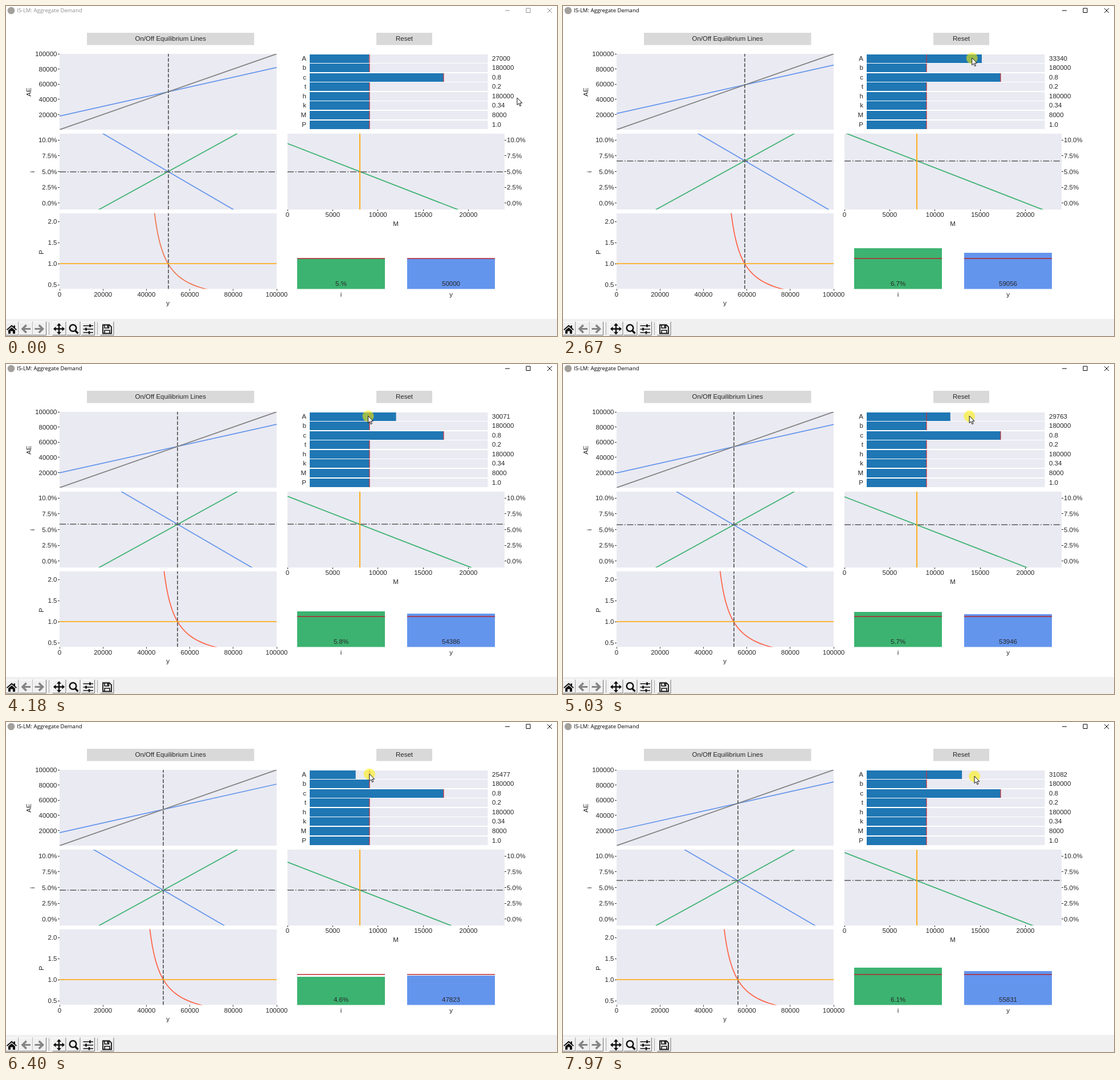
These frames come from a looping animation (967x579 px, 8000 ms). An HTML page:

```html
<!DOCTYPE html>
<html lang="en">
<head>
<meta charset="utf-8">
<title>IS-LM: Aggregate Demand</title>
<style>
html, body { margin: 0; width: 100%; height: 100%; overflow: hidden; background: #fff; }
#stage { display: block; width: 967px; height: 579px; }
text { font-family: "Liberation Sans", Arial, sans-serif; font-size: 11.5px; fill: #262626; }
.title { font-family: "Open Sans", sans-serif; font-size: 9.5px; }
</style>
</head>
<body>
<svg id="stage" viewBox="0 0 967 579"></svg>
<script>
const stage = document.getElementById('stage');
const LOOP = 8000, FOCUS = 1930, PRESS = 2110, LAG = 130;
const BLUE = '#6495ed', GREEN = '#3cb371', ORANGE = '#ffa500', DARK = '#595959', PANEL = '#eaeaf2';
const LINE = 1.73;
const model = { b: 180000, mpc: 0.64, h: 180000, k: 0.34, M: 8000 };

function el(tag, attrs, parent = stage) {
  const node = document.createElementNS('http://www.w3.org/2000/svg', tag);
  set(node, attrs);
  parent.appendChild(node);
  return node;
}
function set(node, attrs) {
  for (const key in attrs) node.setAttribute(key, attrs[key]);
}
function rect(x, y, width, height, fill, parent) {
  return el('rect', { x, y, width, height, fill }, parent);
}
function path(d, stroke, width = LINE, parent = stage, more = {}) {
  return el('path', { d, stroke, 'stroke-width': width, fill: 'none', ...more }, parent);
}
function text(str, x, y, anchor = 'middle', more = {}) {
  const node = el('text', { x, y, 'text-anchor': anchor, ...more });
  node.textContent = str;
  return node;
}
function turned(str, x, y) {
  text(str, 0, 4, 'middle', { transform: `translate(${x} ${y}) rotate(-90)` });
}
function range(from, to, step, draw) {
  for (let v = from; v <= to; v += step) draw(v);
}

// A plot area with data scales and its own clipping
function plot(x, y, width, height, xMax, yMin, yMax) {
  const view = el('svg', { x, y, width, height, viewBox: `${x} ${y} ${width} ${height}` });
  rect(x, y, width, height, PANEL, view);
  const sx = v => x + v / xMax * width;
  const sy = v => y + (yMax - v) / (yMax - yMin) * height;
  const line = points => 'M' + points.map(([a, b]) => sx(a).toFixed(2) + ' ' + sy(b).toFixed(2)).join('L');
  return {
    sx, sy, line,
    chord: f => line([[0, f(0)], [xMax, f(xMax)]]),
    upright: v => `M${Math.round(sx(v))} ${y + height}V${y}`,
    level: v => `M${x} ${Math.round(sy(v))}H${x + width}`,
    add: (color, more) => path('', color, LINE, view, more)
  };
}
const dashes = (...units) => ({ 'stroke-dasharray': units.map(u => u * LINE).join(' ') });
const dashed = dashes(3.7, 1.6), dashDot = dashes(6.4, 1.6, 1, 1.6);

// Window frame
el('circle', { cx: 9, cy: 8, r: 6.3, fill: '#a3a09c' });
const title = text('IS-LM: Aggregate Demand', 19, 11.3, 'start', { class: 'title' });
const controls = path('M876 8H884M913 4H920V11.5H913ZM950 4L958 12M958 4L950 12', '#000', 1);

function button(x, width, label) {
  rect(x, 47, width, 21.5, '#d9d9d9');
  text(label, x + width / 2, 60.5);
}
button(142, 293.5, 'On/Off Equilibrium Lines');
button(650, 98, 'Reset');

// Plots
const spend = plot(94, 84, 381, 133, 1e5, 0, 1e5);
const rate = plot(94, 224, 381, 133, 1e5, -1, 11);
const price = plot(94, 363.5, 381, 133, 1e5, 0.4, 2.2);
const money = plot(494, 224, 381, 133, 24000, -1, 11);

function leftTick(label, y) {
  text(label, 89.5, y + 4.2, 'end');
  path(`M91 ${Math.floor(y) + .5}h3`, '#333', 1);
}
function rightTick(label, y) {
  text(label, 879, y + 4.2, 'start');
  path(`M875 ${Math.floor(y) + .5}h3`, '#333', 1);
}
function bottomTick(label, x, y) {
  text(label, x, y + 13);
  path(`M${Math.floor(x) + .5} ${y}v3`, '#333', 1);
}
range(20000, 1e5, 20000, v => leftTick(v, spend.sy(v)));
range(0, 10, 2.5, v => {
  leftTick(v.toFixed(1) + '%', rate.sy(v));
  rightTick(v.toFixed(1) + '%', money.sy(v));
});
range(0.5, 2, 0.5, v => leftTick(v.toFixed(1), price.sy(v)));
range(0, 1e5, 20000, v => bottomTick(v, price.sx(v), 496.5));
range(0, 20000, 5000, v => bottomTick(v, money.sx(v), 357));
turned('AE', 40, 151);
turned('i', 46, 291);
turned('P', 62, 432);
text('y', 284, 525);
text('M', 684, 386);

const aeLine = spend.add(BLUE);
set(spend.add('#808080'), { d: spend.chord(v => v) });
const isLine = rate.add(BLUE), lmLine = rate.add(GREEN);
const adLine = price.add('#ff6347');
set(price.add(ORANGE), { d: price.level(1) });
const mdLine = money.add(GREEN);
set(money.add(ORANGE), { d: money.upright(model.M) });
const uprights = [spend, rate, price].map(p => [p, p.add(DARK, dashed)]);
const levels = [rate, money].map(p => [p, p.add(DARK, dashDot)]);

// Sliders
const SLIDER = { x: 533, width: 312.5, min: 20250, max: 40500 };
const sliders = ['A 27000', 'b 180000', 'c 0.8', 't 0.2', 'h 180000', 'k 0.34', 'M 8000', 'P 1.0'].map((row, n) => {
  const [name, value] = row.split(' ');
  const y = Math.round(84.6 + n * 16.56);
  const start = SLIDER.width * (name === 'c' ? 0.752 : 0.336);
  rect(SLIDER.x, y, SLIDER.width, 15, PANEL);
  const bar = rect(SLIDER.x, y, start, 15, '#1f77b4');
  path(`M${SLIDER.x + start} ${y}v15`, '#d62728', 1.1);
  text(name, 527, y + 11, 'end');
  return { bar, label: text(value, 853, y + 11, 'start') };
});

// Result bars
function gauge(x, color, name) {
  const bar = rect(x, 443, 154, 53.5, color);
  path(`M${x} 443h154`, '#b8232b', LINE);
  text(name, x + 77, 509.7);
  return { bar, label: text('', x + 77, 491) };
}
function setGauge(g, share, label) {
  const y = Math.round(496.5 - 53.5 * share);
  set(g.bar, { y, height: 496.5 - y });
  g.label.textContent = label;
}
const rateGauge = gauge(511, GREEN, 'i');
const incomeGauge = gauge(704, BLUE, 'y');

// Toolbar
rect(0, 549, 967, 30, '#f0f0f0');
for (const x of [-2, 22.5, 46.5, 81, 106, 131.5, 165]) {
  path(`M${x + .5} 577.5V554.5h23`, '#fff', 1);
  path(`M${x + .5} 577.5h23.5V554`, '#747474', 1);
}
path('M75.5 555v22M160.5 555v22', '#a8a8a8', 1);
const icon = (d, fill = '#111', transform = '') => el('path', { d, fill, transform });
icon('M1 567.5L10 559.5L13.5 562.5V560.5H16V565L19 567.5L17.8 569L10 562.3L2.2 569ZM4 569L10 564L16 569V575H12V570.5H8V575H4Z');
const arrow = 'M26.5 566.5L34.5 558.5L37 561L33 565H43V568H33L37 572L34.5 574.5Z';
icon(arrow, '#848484');
icon(arrow, '#848484', 'translate(93.5 0) scale(-1 1)');
path('M84 566.5H102M93 557.5V575.5', '#111', 2.4);
range(0, 270, 90, a => icon('M0 -10L4 -5.5H-4Z', '#111', `translate(93 566.5) rotate(${a})`));
el('circle', { cx: 117.5, cy: 565, r: 5.8, fill: 'none', stroke: '#111', 'stroke-width': 2.5 });
path('M121.5 569.5L126.5 574.5', '#111', 3.2);
path('M135.5 561H153M135.5 567H153M135.5 573H153', '#111', 1.7);
path('M147.5 558.5v5M140.5 564.5v5M146 570.5v5', '#111', 2.8);
path('M170 559.5H181.5L185 563V574.5H170Z', '#111', 1.8);
path('M173 560V565H180.5V560M173 574V569H182V574', '#111', 1.6);
rect(177.5, 560, 2, 4, '#111');

// Pointer
const pointer = el('g', {});
const halo = el('circle', { cx: 0, cy: 0.5, r: 10, fill: '#fff000', 'fill-opacity': 0.56 }, pointer);
el('path', {
  d: 'M0 0V12.6L2.9 9.9L4.9 14.6L6.9 13.7L4.9 9.2H8.8Z',
  fill: '#fff', stroke: '#111', 'stroke-width': 1, 'stroke-linejoin': 'round'
}, pointer);

// Turning points of the hand: time, x, y; it slows down at each one
const turns = [
  { t: 390, x: 897, y: 161 }, { t: 1100, x: 692, y: 88 }, { t: 1350, x: 671, y: 82 },
  { t: 1510, x: 708, y: 93 }, { t: 1790, x: 702, y: 93 }, { t: 2380, x: 702, y: 93 },
  { t: 2540, x: 735, y: 91 }, { t: 3134, x: 585, y: 91 }, { t: 3754, x: 750, y: 91 },
  { t: 4451, x: 580, y: 91 }, { t: 5192, x: 730, y: 91 }, { t: 5943, x: 545, y: 91 },
  { t: 6450, x: 640, y: 91 }, { t: 6780, x: 575, y: 95 }, { t: 7116, x: 750, y: 95 },
  { t: 7373, x: 600, y: 95 }, { t: 8036, x: 725, y: 95 }
];
function hand(t) {
  const n = turns.findIndex(turn => turn.t > t);
  if (n === 0) return turns[0];
  const from = turns[n - 1], to = turns[n];
  const ease = (1 - Math.cos(Math.PI * (t - from.t) / (to.t - from.t))) / 2;
  return { x: from.x + (to.x - from.x) * ease, y: from.y + (to.y - from.y) * ease };
}
// The dragged slider trails the hand
function demand(t) {
  if (t < PRESS) return 27000;
  const share = (hand(t - LAG).x - SLIDER.x) / SLIDER.width;
  return SLIDER.min + share * (SLIDER.max - SLIDER.min);
}

function showModel(A) {
  const { b, mpc, h, k, M } = model;
  const slope = 1 - mpc + k;
  const y = (A + M) / slope;
  const i = (k * y - M) / h * 100;

  set(aeLine, { d: spend.chord(v => A - b * i / 100 + mpc * v) });
  set(isLine, { d: rate.chord(v => (A - (1 - mpc) * v) / b * 100) });
  set(lmLine, { d: rate.chord(v => (k * v - M) / h * 100) });
  set(mdLine, { d: money.chord(v => (k * y - v) / h * 100) });
  const curve = [];
  range(0.38, 2.24, 0.03, P => curve.push([(A + M / P) / slope, P]));
  set(adLine, { d: price.line(curve) });
  for (const [p, line] of uprights) set(line, { d: p.upright(y) });
  for (const [p, line] of levels) set(line, { d: p.level(i) });

  set(sliders[0].bar, { width: (A - SLIDER.min) / (SLIDER.max - SLIDER.min) * SLIDER.width });
  sliders[0].label.textContent = Math.round(A);
  setGauge(rateGauge, i / 5, i.toFixed(1).replace(/0$/, '') + '%');
  setGauge(incomeGauge, y / 50000, Math.floor(y + 1e-6));
}

function draw(now) {
  const t = now % LOOP, active = t >= FOCUS;
  const { x, y } = hand(t);
  set(title, { style: `fill:${active ? '#000' : '#8c8c8c'}` });
  set(controls, { stroke: active ? '#000' : '#8c8c8c' });
  set(halo, { visibility: active ? 'visible' : 'hidden' });
  set(pointer, { transform: `translate(${x} ${y})` });
  set(adLine, { stroke: t < PRESS ? '#ee7850' : '#ff6347' });
  showModel(demand(t));
  requestAnimationFrame(draw);
}
draw(performance.now());
</script>
</body>
</html>
```
